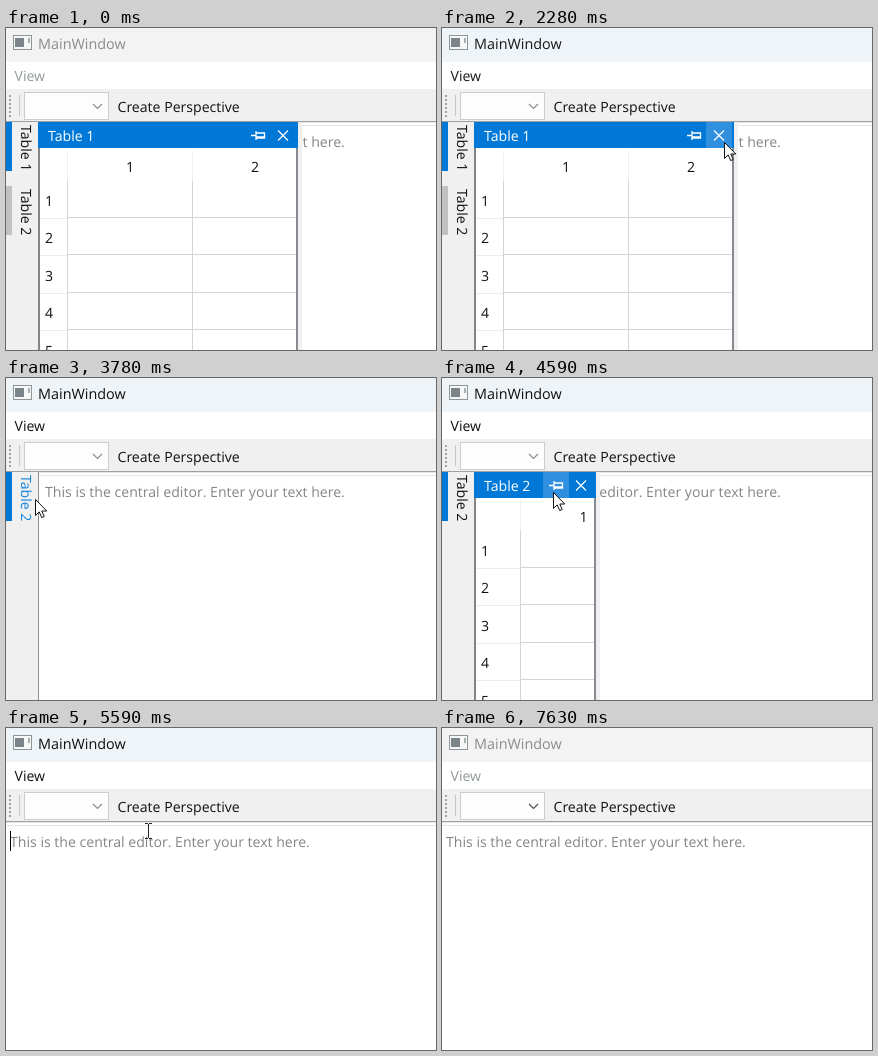
An HTML page that plays this animation: 430 px wide and 322 px high, repeating every 7.7 s.

```html
<!DOCTYPE html>
<html lang="en">
<head>
<meta charset="utf-8">
<title>Auto-hide tabs</title>
<style>
  html, body { margin: 0; height: 100%; overflow: hidden; background: #fff; }
  svg { display: block; width: 430px; height: 322px; }
  text {
    font: 14.1px "Open Sans", "Noto Sans", sans-serif; fill: #111;
    white-space: pre; text-rendering: geometricPrecision;
  }
  .mid { text-anchor: middle; }
  .crisp { shape-rendering: crispEdges; }
</style>
</head>
<body>
<svg viewBox="0 0 430 322">
  <rect id="titleBar" width="430" height="34"/>
  <rect x="7.5" y="7.5" width="18" height="14" fill="#f6f7f7" stroke="#8f9598"/>
  <rect x="9" y="10" width="9" height="9" fill="#7b8589"/>
  <rect x="22" y="10" width="2" height="5" fill="#a9b0b3"/>
  <text id="title" x="32" y="21" style="font-size:14.4px">MainWindow</text>
  <text id="menu" x="8.5" y="53">View</text>

  <g class="crisp">
    <rect y="61" width="430" height="32" fill="#f0f0f0"/>
    <path d="M4 67V89" stroke="#a2a2a2" stroke-width="2" stroke-dasharray="2 2"/>
    <rect x="13" y="67" width="1" height="21" fill="#c6c6c6"/>
    <rect x="18.5" y="64.5" width="84" height="27" fill="#fdfdfd" stroke="#cdcdcd"/>
    <rect y="93" width="430" height="1" fill="#a0a0a0"/>
    <rect y="94" width="430" height="1" fill="#e6e6e6"/>
    <rect y="97" width="430" height="1" fill="#e4e4e4"/>
  </g>
  <path id="chevron" d="M87 76l4.5 4.5 4.5-4.5" fill="none" stroke-width="1.2"/>
  <text x="111.5" y="84">Create Perspective</text>

  <text id="editor" y="119" style="fill:#858585">This is the central editor. Enter your text here.</text>
  <rect id="caret" y="103" width="1" height="20" fill="#000"/>

  <g id="sidebar">
    <rect y="94" width="32" height="228" fill="#f0f0f0"/>
    <rect x="32" y="94" width="1" height="228" fill="#8e8e8e"/>
    <g id="tab1"></g>
    <g id="tab2"></g>
  </g>
  <g id="panel1"></g>
  <g id="panel2"></g>

  <path id="arrow" d="M.5 .5V16.4L4.2 12.9 6.7 18.6 9.2 17.5 6.8 12H11.8Z" fill="#fff" stroke="#111"/>
  <path id="beam" class="crisp" d="M-3 -7.5H0M1 -7.5H4M-3 7.5H0M1 7.5H4M.5 -7V7" fill="none" stroke="#222"/>
</svg>
<script>
const LOOP = 7700, BLINK = 530, BLUE = '#0078d7';
const $ = id => document.getElementById(id);
const show = (id, on) => $(id).style.display = on ? '' : 'none';
const clamp = v => Math.min(1, Math.max(0, v));
const rect = (x, y, w, h, fill, extra = '') =>
  `<rect x="${x}" y="${y}" width="${w}" height="${h}" fill="${fill}" ${extra}/>`;
const text = (x, y, s, extra = '') => `<text x="${x}" y="${y}" ${extra}>${s}</text>`;

function buildTab(id, name) {
  $(id).innerHTML = rect(0, 94, 6, 49, BLUE) +
    text(0, 0, name, 'transform="translate(14.5 97) rotate(90)"');
}

// A pop-out dock: blue title with pin and close buttons above a table.
function buildPanel(id, name, right, split, columns) {
  const lines = [190, 227, 265, 302];
  const pin = right - 39, close = right - 14;
  let out = rect(32, 94, right - 32, 228, '#fff') +
    rect(right + 1, 94, 4, 228, '#f0f0f0') +
    rect(32, 94, right - 31, 26, BLUE) +
    rect(pin - 13, 94, 26, 26, '#3090df', `id="${id}pin"`) +
    rect(close - 13, 94, 26, 26, '#3090df', `id="${id}close"`) +
    `<path d="M${pin - 7} 107.5h5M${pin - 2} 103v9M${pin - 2} 105h8.5v5h-8.5M${pin - 2} 109h8"
      fill="none" stroke="#fff" stroke-width="1.3"/>` +
    `<path d="M${close - 5} 102.5l10 10m0 -10l-10 10" stroke="#fff" stroke-width="1.2"/>` +
    text(42, 113, name, 'style="fill:#fff"') +
    rect(split, 123, 1, 30, '#efefef') +
    rect(split, 153, 1, 169, '#d4d4d4');
  for (const [label, x, edge] of columns) {
    out += text(x, 144, label, 'class="mid"');
    if (edge) out += rect(edge, 123, 1, 30, '#efefef') + rect(edge, 153, 1, 169, '#d4d4d4');
  }
  lines.forEach(y => out += rect(34, y, split - 34, 1, '#ededed') +
    rect(split, y - 1, right - split, 1, '#d4d4d4'));
  for (let i = 0; i < 5; i++) out += text(39, Math.round(178 + i * 37.4), i + 1);
  out += rect(32, 120, 2, 202, '#858585') + rect(right - 1, 120, 2, 202, '#858b90');
  $(id).innerHTML = out;
}

buildTab('tab1', 'Table 1');
buildTab('tab2', 'Table 2');
buildPanel('panel1', 'Table 1', 291, 61, [[1, 124, 186], [2, 249, 0]]);
buildPanel('panel2', 'Table 2', 153, 78, [[1, 141.5, 0]]);

// Pointer way points: time, x, y
const path = [
  [790, 394, 316], [1100, 338, 216], [1350, 296, 140], [1550, 282, 118], [1620, 282, 117],
  [1690, 282, 114], [2880, 282, 114], [3090, 78, 123], [3300, 20, 154], [3480, 30, 138],
  [3650, 46, 121], [3780, 29, 121], [3930, 20, 120], [4530, 20, 120], [4590, 111, 114],
  [4800, 122, 112], [5060, 142, 103], [5790, 142, 103], [6050, 60, 84], [6300, 21, 142],
  [6550, 8, 92], [6620, 12, 98], [6900, 344, 340]
];

function pointer(t) {
  const i = path.findIndex(p => p[0] > t);
  if (i < 1) return null;
  const [t0, x0, y0] = path[i - 1], [t1, x1, y1] = path[i];
  const k = (t - t0) / (t1 - t0);
  return [Math.round(x0 + (x1 - x0) * k), Math.round(y0 + (y1 - y0) * k)];
}

function setTab(id, dy, active, hover) {
  const [bar, label] = $(id).children;
  $(id).setAttribute('transform', `translate(0 ${dy})`);
  bar.setAttribute('fill', active || hover ? BLUE : '#c1c1c1');
  label.style.fill = hover ? '#1585da' : '#111';
}

function draw(t) {
  const first = t < 2290, second = t >= 4200 && t < 5530, docked = t < 5530;
  const active = clamp((t - 2090) / 200) - clamp((t - 7430) / 200);
  const mix = (a, b) => Math.round(a + (b - a) * active);
  const at = pointer(t), [x, y] = at || [-99, -99];
  const inside = (left, right) => x >= left && x < right && y >= 94 && y < 120;

  $('titleBar').setAttribute('fill', `rgb(${mix(243, 239)} ${mix(243, 244)} ${mix(243, 249)})`);
  const ink = mix(140, 17);
  $('title').style.fill = `rgb(${ink} ${ink} ${ink})`;
  $('menu').style.fill = `rgb(${mix(146, 17)} ${mix(156, 17)} ${mix(148, 17)})`;
  $('chevron').setAttribute('stroke', t >= 6000 ? '#505050' : '#8c8c8c');

  const margin = docked ? 39 : 4;
  $('editor').setAttribute('x', margin);
  $('caret').setAttribute('x', margin);
  const since = t - (t < 5310 ? 2090 : 5310);
  show('caret', since >= 0 && t < 7600 && Math.floor(since / BLINK) % 2 === 0);

  show('sidebar', docked);
  show('tab1', first);
  setTab('tab1', 0, true, false);
  setTab('tab2', first ? 64 : 0, second, !first && x < 33 && y >= 94 && y < 143 && at);

  show('panel1', first);
  show('panel1pin', false);
  show('panel1close', inside(264, 290));
  show('panel2', second);
  show('panel2pin', inside(101, 127));
  show('panel2close', inside(127, 153) && t < 5330);

  const edge = first ? 292 : second ? 154 : docked ? 33 : 0;
  const arrow = y < 94 || x < edge;
  show('arrow', at && arrow);
  show('beam', at && !arrow);
  $(arrow ? 'arrow' : 'beam').setAttribute('transform', `translate(${x} ${y})`);
}

const start = performance.now();
function tick() {
  draw((performance.now() - start) % LOOP);
  requestAnimationFrame(tick);
}
tick();
</script>
</body>
</html>
```
